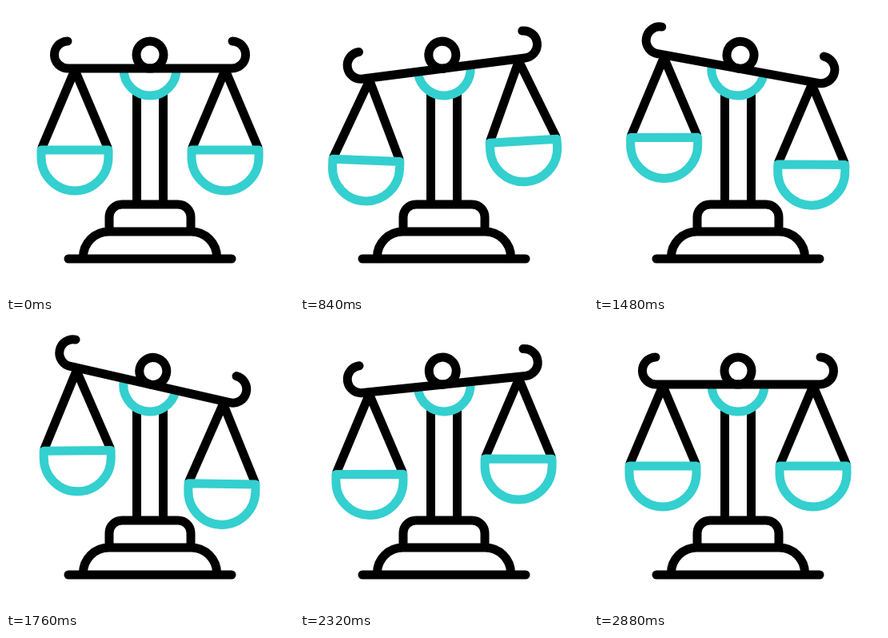
These frames come from a looping animation (360 px wide and 360 px high, 3000 ms). An HTML page:

```html
<!DOCTYPE html>
<html lang="en">
<head>
<meta charset="utf-8">
<title>Balance scale</title>
<style>
  html, body { margin: 0; width: 100%; height: 100%; overflow: hidden; background: #fff; }
  svg { display: block; width: 100vw; height: 100vh; }
  g { fill: none; stroke: #000; stroke-width: 11; stroke-linecap: round; stroke-linejoin: round; }
  .teal { stroke: #34cfcf; }
  .butt { stroke-linecap: butt; }
</style>
</head>
<body>
<svg viewBox="0 0 360 360">
  <defs>
    <!-- pan hanging from the point 0,0 -->
    <g id="pan">
      <path d="M-41 98L0 1L41 98"/>
      <path class="teal" d="M-42 101H42V110A42 42 0 0 1 -42 110Z"/>
    </g>
  </defs>
  <g>
    <path d="M78 316H282"/>
    <path class="butt" d="M96.5 316V314A32 32 0 0 1 128.5 282H231.5A32 32 0 0 1 263.5 314V316"/>
    <path class="butt" d="M129 280V264A16 16 0 0 1 145 248H215A16 16 0 0 1 231 264V280"/>
    <path class="butt" d="M163.5 109V248M196.5 109V248"/>
  </g>
  <g id="beam">
    <path class="teal butt" d="M147 79A33 33 0 0 0 213 79"/>
    <path d="M77 44A17 17 0 0 0 78 78H282A17 17 0 0 0 283 44"/>
    <circle cx="180" cy="61" r="17"/>
  </g>
  <use id="left" href="#pan"/>
  <use id="right" href="#pan"/>
</svg>
<script>
  const LOOP = 3000, STEP = 40, ARM = 94;
  const PIVOT = { x: 180, y: 78 };
  // time, beam tilt, pan swing (degrees)
  const keys = [
    [0, 0, 0],
    [280, 0, 0],
    [770, -7.7, 2.3],
    [1700, 13.3, -0.6],
    [2310, -5.9, -0.2],
    [2860, 0, 0],
    [LOOP, 0, 0]
  ];
  const [beam, left, right] = ['beam', 'left', 'right'].map(id => document.getElementById(id));

  const ease = u => u * u * (3 - 2 * u);

  function pose(t) {
    const i = keys.findIndex(k => k[0] > t);
    const a = keys[i - 1], b = keys[i];
    const p = ease((t - a[0]) / (b[0] - a[0]));
    return [1, 2].map(n => a[n] + (b[n] - a[n]) * p);
  }

  function hang(el, side, tilt, swing) {
    const r = tilt * Math.PI / 180, c = Math.cos(r), s = Math.sin(r);
    const x = PIVOT.x + side * ARM * c - s;
    const y = PIVOT.y + side * ARM * s + c + 0.13 * Math.abs(tilt);
    el.setAttribute('transform', `translate(${x} ${y}) rotate(${swing})`);
  }

  function draw(now) {
    const t = Math.floor((now % LOOP) / STEP) * STEP;
    const [tilt, swing] = pose(t);
    beam.setAttribute('transform', `rotate(${tilt} ${PIVOT.x} ${PIVOT.y})`);
    hang(left, -1, tilt, swing);
    hang(right, 1, tilt, -1.45 * swing);
  }

  function tick() {
    draw(performance.now());
    requestAnimationFrame(tick);
  }
  tick();
</script>
</body>
</html>
```
